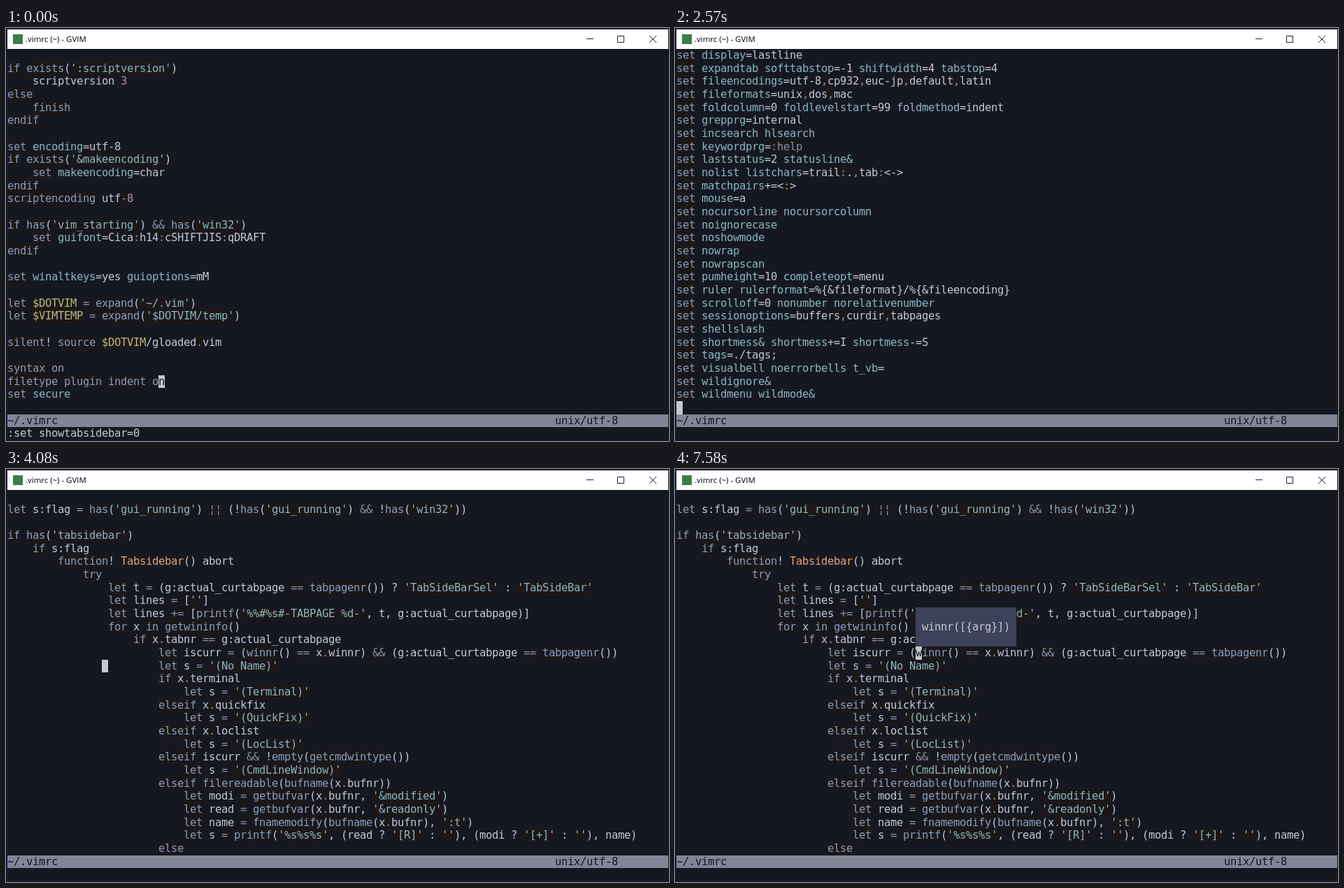
Animation of 948 by 591 pixels, one loop 8 s. Source, as an HTML page:

```html
<!DOCTYPE html>
<html lang="en">
<head>
<meta charset="utf-8">
<title>.vimrc (~) - GVIM</title>
<style>
html, body { margin: 0; width: 100%; height: 100%; overflow: hidden; background: #0b1b36; }
#stage { position: relative; width: 948px; height: 591px; overflow: hidden; }
#stage div, #stage svg { position: absolute; }
#bar { left: 2px; top: 2px; width: 945px; height: 28px; background: #fff; }
#icon { left: 8px; top: 7px; width: 14px; height: 14px; background: #3c7d4b; }
#title { left: 26px; top: 0; font: 11.45px/28px "Open Sans", sans-serif; color: #000; white-space: pre; }
#bar svg { left: 0; top: 0; fill: none; stroke: #222; }
#screen {
  left: 2px; top: 30px; width: 946px; height: 560px; overflow: hidden;
  background: #161821; color: #c6c8d1; white-space: pre;
  font: 15.5px/18.667px "DejaVu Sans Mono", "Noto Sans Mono", monospace;
  letter-spacing: calc(9px - 1ch); font-variant-ligatures: none;
}
#view { left: 0; top: 0; width: 946px; height: 522.67px; overflow: hidden; }
#status { left: 0; top: 522.67px; width: 945px; height: 18.667px; background: #818596; color: #17171b; }
#ruler { left: 783px; }
#cmd { left: 0; top: 541.33px; }
#cursor { width: 9px; height: 18.667px; background: #c6c8d1; color: #161821; }
#popup { height: 56px; line-height: 56px; background: #3d425b; }
.kw, .fn, .op, .str, .env, .num { background: #1c1718; }
.kw { color: #869dbf; }
.fn { color: #84a0c6; }
.op { color: #7e92b3; }
.str, .opt { color: #89b8c2; }
.env { color: #b4be82; }
.num { color: #a093c7; }
.name { color: #e2a478; }
.note { color: #6b7089; }
</style>
</head>
<body>
<div id="stage">
  <div id="bar">
    <div id="icon"></div>
    <div id="title">.vimrc (~) - GVIM</div>
    <svg width="945" height="28">
      <path d="M828 13.5h10M872.5 9.5h9v9h-9zM918 9l10 10M928 9l-10 10"/>
    </svg>
  </div>
  <div id="screen">
    <div id="view"><div id="text"></div></div>
    <div id="status">~/.vimrc<div id="ruler" style="top:0">unix/utf-8</div></div>
    <div id="cmd">:set showtabsidebar=0</div>
    <div id="popup"></div>
    <div id="cursor"></div>
  </div>
</div>
<script>
const COL = 9, ROW = 560 / 30, LOOP = 8000;

const lines = String.raw`
if exists(':scriptversion')
    scriptversion 3
else
    finish
endif

set encoding=utf-8
if exists('&makeencoding')
    set makeencoding=char
endif
scriptencoding utf-8

if has('vim_starting') && has('win32')
    set guifont=Cica:h14:cSHIFTJIS:qDRAFT
endif

set winaltkeys=yes guioptions=mM

let $DOTVIM = expand('~/.vim')
let $VIMTEMP = expand('$DOTVIM/temp')

silent! source $DOTVIM/gloaded.vim

syntax on
filetype plugin indent on
set secure

augroup vimrc
    autocmd!
augroup END

set ambiwidth=double
set autoindent
set autoread autowrite
set background=dark
set backspace=indent,eol,start
set belloff=all
set breakindent
set clipboard=unnamed
set cmdheight=1
set cmdwinheight=10
set complete=.,w,b,u,t completeslash=slash concealcur=
set conceallevel=0
set copyindent
set cpoptions&
set cscopequickfix=
set cursorlineopt=number
set diffopt=filler,vertical
set display=lastline
set expandtab softtabstop=-1 shiftwidth=4 tabstop=4
set fileencodings=utf-8,cp932,euc-jp,default,latin
set fileformats=unix,dos,mac
set foldcolumn=0 foldlevelstart=99 foldmethod=indent
set grepprg=internal
set incsearch hlsearch
set keywordprg=:help
set laststatus=2 statusline&
set nolist listchars=trail:.,tab:<->
set matchpairs+=<:>
set mouse=a
set nocursorline nocursorcolumn
set noignorecase
set noshowmode
set nowrap
set nowrapscan
set pumheight=10 completeopt=menu
set ruler rulerformat=%{&fileformat}/%{&fileencoding}
set scrolloff=0 nonumber norelativenumber
set sessionoptions=buffers,curdir,tabpages
set shellslash
set shortmess& shortmess+=I shortmess-=S
set tags=./tags;
set visualbell noerrorbells t_vb=
set wildignore&
set wildmenu wildmode&


let s:flag = has('gui_running') ¦¦ (!has('gui_running') && !has('win32'))

if has('tabsidebar')
    if s:flag
        function! Tabsidebar() abort
            try
                let t = (g:actual_curtabpage == tabpagenr()) ? 'TabSideBarSel' : 'TabSideBar'
                let lines = ['']
                let lines += [printf('%%#%s#-TABPAGE %d-', t, g:actual_curtabpage)]
                for x in getwininfo()
                    if x.tabnr == g:actual_curtabpage
                        let iscurr = (winnr() == x.winnr) && (g:actual_curtabpage == tabpagenr())
                        let s = '(No Name)'
                        if x.terminal
                            let s = '(Terminal)'
                        elseif x.quickfix
                            let s = '(QuickFix)'
                        elseif x.loclist
                            let s = '(LocList)'
                        elseif iscurr && !empty(getcmdwintype())
                            let s = '(CmdLineWindow)'
                        elseif filereadable(bufname(x.bufnr))
                            let modi = getbufvar(x.bufnr, '&modified')
                            let read = getbufvar(x.bufnr, '&readonly')
                            let name = fnamemodify(bufname(x.bufnr), ':t')
                            let s = printf('%s%s%s', (read ? '[R]' : ''), (modi ? '[+]' : ''), name)
                        else
                            if !empty(sline)
                                let s = sline
                            elseif !empty(ft)
                                let s = printf('[%s]', ft)
                            endif
                        endif
                        let lines += [printf('  %s %s', (iscurr ? '*' : ' '), s)]
                    endif
                endfor
                return join(lines, "\n")
            catch
                return string(v:exception)
            endtry
        endfunction
        set showtabsidebar=2
        set tabsidebarcolumns=20
        set notabsidebarwrap
        set tabsidebar=%!Tabsidebar()
    endif
endif

" SWAP FILES
set noswapfile

" BACKUP FILES
silent! call mkdir(expand('$VIMTEMP/backupfiles'), 'p')
set backup
set nowritebackup`.split("\n");

const FUNC = lines.findIndex(l => l.startsWith("let s:flag")) - 1;

const keywords = new Set(("if else elseif endif finish let set scriptencoding silent source syntax on filetype " +
  "plugin indent function endfunction try catch endtry for in endfor return call augroup autocmd").split(" "));

const tokens = /'[^']*'|"\\n"|\$\w+|[gsv]:\w+|[A-Za-z_]\w*|-?\d+|&&|¦¦|[=+]?=|\.|./g;

function kind(tok, next) {
  if (/^['"]/.test(tok)) return "str";
  if (/^\$\w/.test(tok)) return "env";
  if (/^-?\d/.test(tok)) return "num";
  if (tok === "Tabsidebar") return "name";
  if (keywords.has(tok)) return "kw";
  if (/^\w+$/.test(tok) && next === "(") return "fn";
  if (/^(&&|¦¦|\+?=|==|\.)$/.test(tok)) return "op";
  return "";
}

function add(parent, text, cls) {
  if (!text) return;
  const span = document.createElement("span");
  span.textContent = text;
  span.className = cls;
  parent.append(span);
}

function paintSet(row, indent, rest) {
  row.append(indent);
  add(row, "set", "kw");
  for (const [, gap, name, value = ""] of rest.matchAll(/(\s)([a-z_]+&?)([-+]?=\S*)?/g)) {
    row.append(gap);
    add(row, name, "opt");
    for (const part of value.split(/(:help|[,:])/)) add(row, part, /^(:help|[,:])$/.test(part) ? "op" : "");
  }
}

const $ = id => document.getElementById(id);
const [text, cursor, popup, cmd] = ["text", "cursor", "popup", "cmd"].map($);

lines.forEach((line, i) => {
  const row = document.createElement("div");
  row.style.top = i * ROW + "px";
  const set = line.match(/^(\s*)set(\s.*)/);
  if (set) paintSet(row, set[1], set[2]);
  else if (line.startsWith('" ')) add(row, line, "note");
  else for (const m of line.matchAll(tokens)) add(row, m[0], kind(m[0], line[m.index + m[0].length]));
  text.append(row);
});

const EXPAND = "expand({expr} [, {nosuf} [, {list}]])";
const WININFO = "getwininfo([{winid}])";
const WINNR = "winnr([{arg}])";

// time, first line, cursor row, wanted column, popup
const steps = [
  [0, 0, 25, 30], [280, 0, 24, 30], [410, 0, 23, 30], [550, 0, 22, 30], [670, 0, 21, 30],
  [920, 0, 20, 30], [1070, 0, 20, 24], [1220, 0, 20, 21], [1470, 0, 20, 15, EXPAND],
  [2150, 7, 27, 15], [2300, 21, 27, 15], [2420, 35, 27, 15], [2570, 49, 27, 15],
  [3130, FUNC + 14, 27, 15], [3280, FUNC + 28, 27, 15], [3400, FUNC + 28, 13, 15],
  [3800, FUNC + 27, 0, 15], [4080, FUNC, 13, 15], [4610, FUNC, 14, 15], [4730, FUNC, 13, 15],
  [5010, FUNC, 12, 15], [5160, FUNC, 11, 15], [5280, FUNC, 11, 20], [5430, FUNC, 10, 20],
  [5550, FUNC, 10, 23], [5820, FUNC, 10, 25, WININFO], [6540, FUNC, 11, 25], [6660, FUNC, 12, 25],
  [6810, FUNC, 12, 28], [6930, FUNC, 12, 31], [7050, FUNC, 12, 35],
  [7330, FUNC, 12, 37, WINNR], [7580, FUNC, 12, 38, WINNR]
];

let shown;
function show(step) {
  if (step === shown) return;
  shown = step;
  const [time, top, row, want, tip] = step;
  const line = lines[top + row];
  const col = Math.max(0, Math.min(want, line.length - 1));
  text.style.top = -top * ROW + "px";
  cursor.style.left = col * COL + "px";
  cursor.style.top = row * ROW + "px";
  cursor.textContent = line[col] || " ";
  cmd.hidden = time >= 2300;
  popup.hidden = !tip;
  if (tip) {
    popup.textContent = ` ${tip} `;
    popup.style.left = col * COL + "px";
    popup.style.top = (row - 3) * ROW + "px";
    popup.style.width = (tip.length + 2) * COL + "px";
  }
}

const start = performance.now();
function tick() {
  const t = (performance.now() - start) % LOOP;
  show(steps.findLast(s => s[0] <= t));
  requestAnimationFrame(tick);
}
tick();
</script>
</body>
</html>
```
